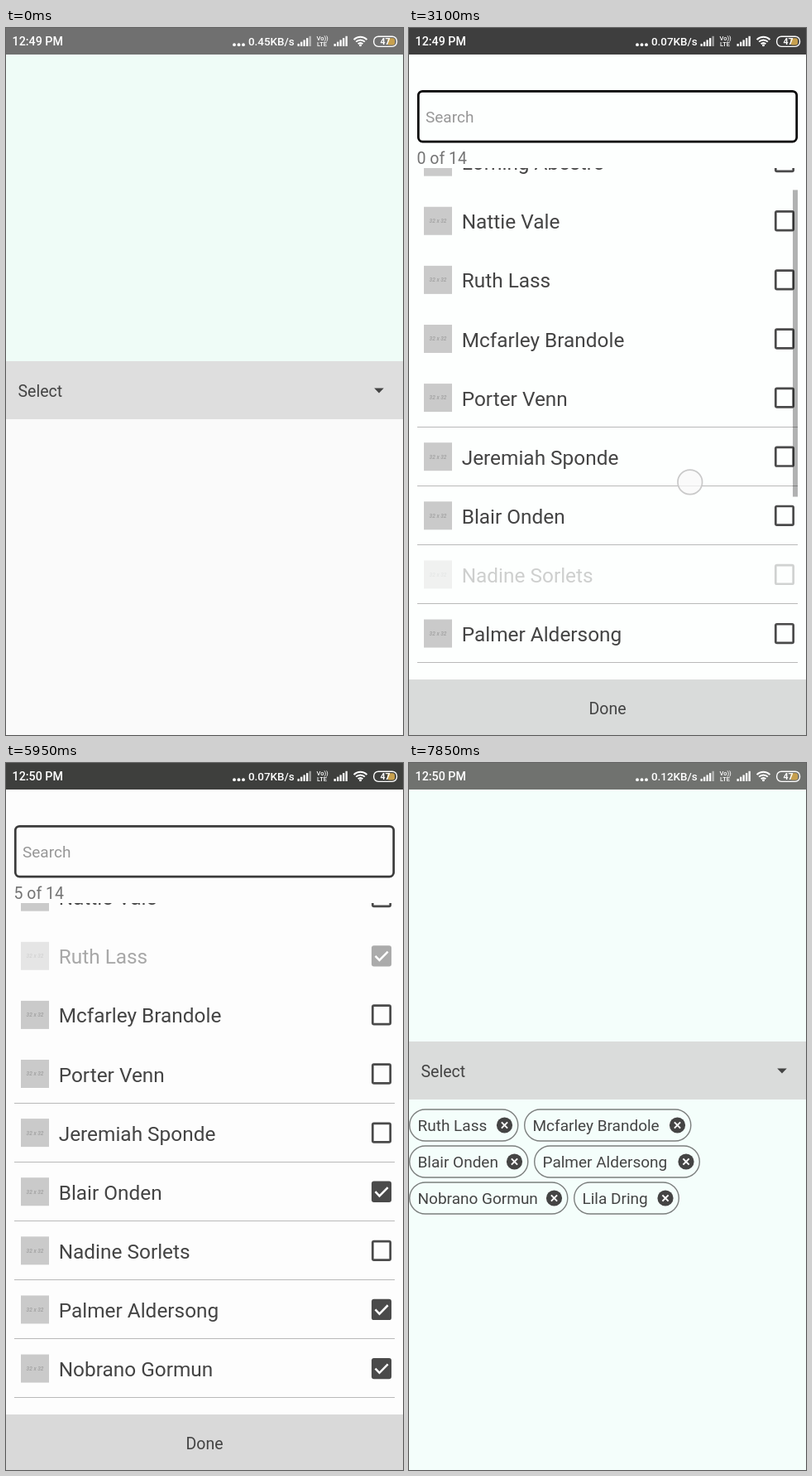
These frames come from a looping animation (480x853 px, 8000 ms). An HTML page:

```html
<!DOCTYPE html>
<html lang="en">
<head>
<meta charset="utf-8">
<title>Multi select list</title>
<style>
  html, body { margin: 0; width: 100%; height: 100%; overflow: hidden; background: #f4fefc; }
  svg { display: block; width: 480px; height: 853px; }
  text { font-family: Roboto, "Noto Sans", sans-serif; white-space: pre; }
</style>
</head>
<body>
<svg id="stage" viewBox="0 0 480 853" xmlns="http://www.w3.org/2000/svg">
  <defs><clipPath id="listClip"><rect x="0" y="169" width="480" height="607"/></clipPath>
  <clipPath id="bodyClip"><rect x="0" y="32" width="480" height="821"/></clipPath></defs>
</svg>
<script>
const LOOP = 8000, PITCH = 640 / 9, VIEW = 607, TOP = 169;
const INK = '#444';
const names = ['Lorning Abestre', 'Nattie Vale', 'Ruth Lass', 'Mcfarley Brandole', 'Porter Venn',
  'Jeremiah Sponde', 'Blair Onden', 'Nadine Sorlets', 'Palmer Aldersong', 'Nobrano Gormun',
  'Dana Whitlen', 'Margaret Pholts', 'Terry Lindel', 'Lila Dring'];

// [row, time, x, y]
const taps = [[12, 3950, 318, 664], [9, 4130, 316, 450], [8, 4300, 316, 369], [6, 4480, 312, 240],
  [12, 4650, 310, 668], [13, 4900, 306, 738], [2, 5850, 300, 230], [3, 6220, 296, 302]];
// [row, start, hold]
const presses = taps.map(([row, at]) => [row, at, 60]).concat([[7, 3040, 80], [7, 5200, 180]]);
// [start, x, y, end, x, y]
const touches = taps.map(([, at, x, y]) => [at, x, y, at + 25, x, y]).concat([
  [3040, 347, 676, 3200, 328, 340],
  [5200, 291, 330, 5480, 291, 648],
  [6700, 269, 833, 6900, 269, 833]
]);
const scrollKeys = [[3000, 0], [3050, 8], [3100, 41.97], [3200, 180], [3300, 275], [3400, 335],
  [3500, 368], [3600, 388.64], [5250, 388.64], [5300, 350], [5350, 285], [5400, 204.95],
  [5450, 160], [5500, 133], [5600, 114.44]];

const stage = document.getElementById('stage');

function add(parent, tag, attrs = {}, text) {
  const node = document.createElementNS('http://www.w3.org/2000/svg', tag);
  set(node, attrs);
  if (text !== undefined) node.textContent = text;
  parent.appendChild(node);
  return node;
}
function set(node, attrs) {
  for (const key in attrs) node.setAttribute(key, attrs[key]);
}
function label(parent, x, y, size, fill, text, more = {}) {
  return add(parent, 'text', { x, y, 'font-size': size, fill, ...more }, text);
}
function box(parent, x, y, width, height, fill, more = {}) {
  return add(parent, 'rect', { x, y, width, height, fill, ...more });
}
function clamp(v) { return Math.max(0, Math.min(1, v)); }
function ease(v) { return (1 - Math.cos(Math.PI * clamp(v))) / 2; }
function track(t, keys) {
  if (t <= keys[0][0]) return keys[0][1];
  for (let i = 1; i < keys.length; i++) {
    const [a, from] = keys[i - 1], [b, to] = keys[i];
    if (t < b) return from + (to - from) * (t - a) / (b - a);
  }
  return keys[keys.length - 1][1];
}
function mix(a, b, k) {
  return 'rgb(' + a.map((v, i) => Math.round(v + (b[i] - v) * k)) + ')';
}

// Home page
const upper = box(stage, 0, 0, 480, 472, '');
const lower = box(stage, 0, 472, 480, 381, '');
const picker = add(stage, 'g');
const pickerBar = box(picker, 0, 402, 480, 70, '');
label(picker, 14.5, 445, 19.5, INK, 'Select');
add(picker, 'path', { d: 'M445.2 434.5h11.6l-5.8 6z', fill: INK });

// Chips: row, left, right, text left
const chips = add(stage, 'g');
[[2, 0, 132.5, 10.5], [3, 139, 341.5, 149.5], [6, 0, 144.5, 10.5], [8, 151, 352, 161.5],
 [9, 0, 192.5, 10.5], [13, 199, 327, 209.5]].forEach(([row, left, right, textX], i) => {
  const y = 437 + 44 * Math.floor(i / 2), x = right - 17;
  box(chips, left + .7, y - 19, right - left - 1.4, 38, 'none',
    { rx: 19, stroke: '#7c7f7e', 'stroke-width': 1.4 });
  label(chips, textX, y + 6.8, 19, INK, names[row]);
  add(chips, 'circle', { cx: x, cy: y, r: 9.6, fill: INK });
  add(chips, 'path', { d: `M${x - 3.6} ${y - 3.6}l7.2 7.2m0-7.2l-7.2 7.2`, stroke: '#fff', 'stroke-width': 2 });
});

const statusBack = box(stage, 0, 0, 480, 32, '#707170');
const dim = box(stage, 0, 0, 480, 853, '#000');

// Modal
const modalWrap = add(stage, 'g', { 'clip-path': 'url(#bodyClip)' });
const modal = add(modalWrap, 'g');
const sheet = box(modal, 0, 32, 480, 821, '');
const field = box(modal, 11.3, 76.3, 457.4, 60.8, 'none', { rx: 5, 'stroke-width': 2.7 });
label(modal, 20, 114, 19, '#979797', 'Search');
const counter = label(modal, 9.5, 164, 19.5, '#747474', '');
const list = add(modal, 'g', { 'clip-path': 'url(#listClip)' });
const rows = names.map(name => {
  const line = box(list, 10, 0, 460, 1, '#b9b9b9');
  const body = add(list, 'g');
  box(body, 18, -52, 34, 34, '#cacaca');
  label(body, 35, -32.6, 6.5, '#a6a6a6', '32 x 32',
    { 'text-anchor': 'middle', 'font-weight': 700, 'font-style': 'italic' });
  label(body, 63.7, -25.4, 24.4, INK, name);
  const mark = box(body, 443.3, -46.3, 21.4, 22.6, 'none', { rx: 1.6, stroke: '#4a4a4a', 'stroke-width': 2.7 });
  const tick = add(body, 'path', { d: 'M446.5-35l5 5.2 10.2-10.4', fill: 'none', stroke: '#fff', 'stroke-width': 2.5 });
  return { line, body, mark, tick };
});
const thumb = box(list, 464, 0, 6, VIEW * VIEW / (14 * PITCH), '#000');
const done = add(modal, 'g');
const doneBar = box(done, 0, 786, 480, 67, '');
label(done, 240, 827.5, 19.5, INK, 'Done', { 'text-anchor': 'middle' });

const ring = add(stage, 'circle', { r: 14.8, fill: '#f8f8f8', 'fill-opacity': .75, stroke: '#c9c9c9', 'stroke-width': 1.7 });

// Status bar
const bar = add(stage, 'g', { fill: '#fff' });
const white = '#fff', bold = { 'font-weight': 500 };
const clock = label(bar, 7.5, 21.3, 14.3, white, '', bold);
const speed = label(bar, 293, 21, 13.4, white, '', bold);
for (let i = 0; i < 3; i++) add(bar, 'circle', { cx: 276 + i * 5.5, cy: 20.2, r: 1.9 });
for (const x of [352.5, 396.5]) {
  for (let i = 0; i < 5; i++) {
    const h = 3 + i * 2.3;
    box(bar, x + i * 3.5, 22 - h, 2.3, h, white, { opacity: x < 360 && i > 3 ? .5 : 1 });
  }
}
label(bar, 375.5, 15.3, 7.5, white, 'Vo))', bold);
label(bar, 376, 22.4, 7.5, white, 'LTE', bold);
for (const r of [11, 7.4, 3.9]) {
  const d = r * .72;
  add(bar, 'path', { d: `M${428.5 - d} ${22 - d}A${r} ${r} 0 0 1 ${428.5 + d} ${22 - d}`,
    fill: 'none', stroke: white, 'stroke-width': 2 });
}
add(bar, 'circle', { cx: 428.5, cy: 20.8, r: 1.5 });
box(bar, 444.7, 10.2, 27.8, 12.2, 'none', { rx: 5.5, stroke: white, 'stroke-width': 1.4 });
box(bar, 461, 12.2, 9, 8.2, '#c7a04e', { rx: 2.5 });
label(bar, 458.6, 20.2, 10.5, white, '47', { 'text-anchor': 'middle', 'font-weight': 700 });

function pressAlpha(row, t) {
  let alpha = 1;
  for (const [r, at, hold] of presses) {
    if (r === row) alpha = Math.min(alpha, track(t, [[at, 1], [at + 40, .25], [at + hold, .25], [at + hold + 150, 1]]));
  }
  return alpha;
}

function drawHome(t) {
  const tone = ease((t - 200) / 700), after = t > 4500;
  set(upper, { fill: mix([239, 252, 247], [244, 254, 251], tone) });
  set(lower, { fill: mix([250, 250, 250], [244, 254, 251], tone) });
  set(pickerBar, { fill: after ? '#dadcdb' : mix([222, 222, 222], [216, 216, 216], tone) });
  set(picker, { transform: `translate(0 ${after ? -66 : 0})`, opacity: t >= 2000 && !after ? .27 : 1 });
  set(chips, { visibility: after ? 'visible' : 'hidden' });
  set(statusBack, { fill: after ? '#70726f' : '#707070' });
}

function drawList(t) {
  const scroll = track(t, scrollKeys);
  let count = 0;
  rows.forEach(({ line, body, mark, tick }, i) => {
    const y = 240 + PITCH * i - scroll;
    const on = taps.filter(([r, at]) => r === i && t >= at + 30).length % 2 === 1;
    if (on) count++;
    // hairlines drop out with their sub-pixel phase
    const shown = i < 13 && y - Math.floor(y) < .57;
    set(line, { y: Math.floor(y), visibility: shown ? 'inherit' : 'hidden' });
    set(body, { transform: `translate(0 ${y.toFixed(2)})`, opacity: pressAlpha(i, t) });
    set(mark, { fill: on ? '#4a4a4a' : 'none' });
    set(tick, { visibility: on ? 'inherit' : 'hidden' });
  });
  counter.textContent = `${count} of 14`;
  const fade = track(t, [[3030, 0], [3070, 1], [3650, 1], [3850, 0], [5230, 0], [5270, 1], [5450, 1], [5650, 0]]);
  set(thumb, { y: TOP + scroll * VIEW / (14 * PITCH), opacity: .3 * fade });
}

function drawModal(t) {
  const slide = t < 4500 ? 1 - ease((t - 2180) / 440) : ease((t - 6880) / 270);
  const active = (t >= 3050 && t < 3875) || (t >= 4850 && t < 5700);
  set(modal, { transform: `translate(0 ${(821 * slide).toFixed(2)})`, visibility: slide >= 1 ? 'hidden' : 'visible' });
  set(dim, { opacity: .45 * (1 - slide) });
  set(sheet, { fill: active ? '#fdfffe' : '#fdfdfd' });
  set(field, { stroke: active ? '#000' : '#3b3b3b' });
  set(doneBar, { fill: active ? '#d9dbda' : '#d9d9d9' });
  set(done, { opacity: t >= 6700 ? .27 : 1 });
}

function drawRing(t) {
  let alpha = 0;
  for (const [a, x, y, b, x2, y2] of touches) {
    if (t < a || t > b + 60) continue;
    const k = (t - a) / (b - a);
    alpha = 1 - clamp((t - b) / 60);
    set(ring, { cx: x + (x2 - x) * k, cy: y + (y2 - y) * k });
  }
  set(ring, { opacity: alpha });
}

function draw(t) {
  drawHome(t);
  drawModal(t);
  drawList(t);
  drawRing(t);
  clock.textContent = t < 3900 ? '12:49 PM' : '12:50 PM';
  speed.textContent = (t < 2500 ? '0.45' : t < 6000 ? '0.07' : '0.12') + 'KB/s';
}

const start = performance.now();
function tick() {
  draw((performance.now() - start) % LOOP);
  requestAnimationFrame(tick);
}
tick();
</script>
</body>
</html>
```
